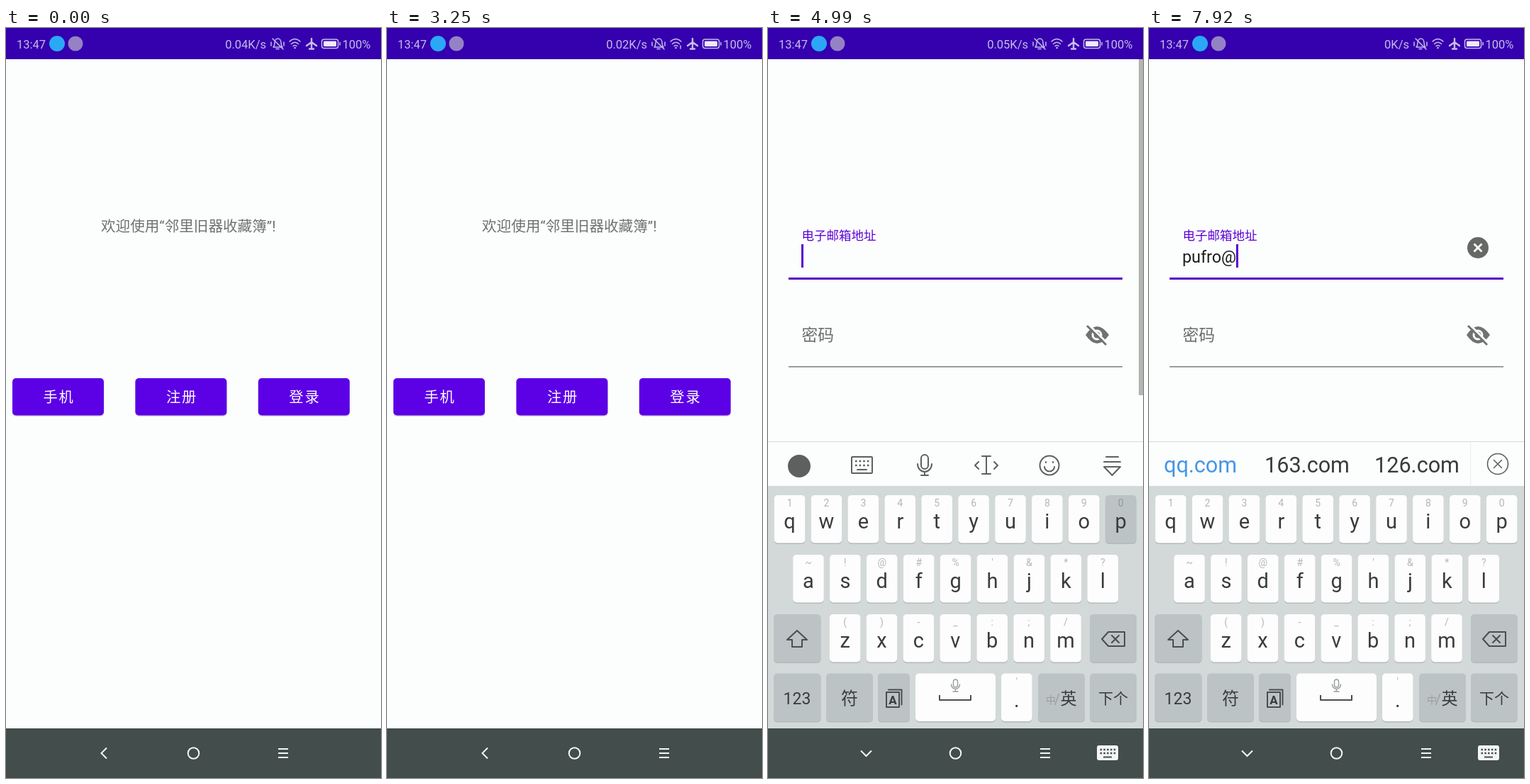
An HTML page for the animation above (8000 ms loop, 529 px wide and 1058 px high).

```html
<!DOCTYPE html>
<html lang="zh-CN">
<head>
<meta charset="utf-8">
<title>登录演示</title>
<style>
  html, body { margin: 0; width: 100%; height: 100%; overflow: hidden; background: #fcfdfd; }
  svg { display: block; width: 529px; height: 1058px; font-family: Roboto, "Noto Sans CJK SC", "Noto Sans CJK", sans-serif; }
  .line { fill: none; stroke-width: 2; stroke-linecap: round; stroke-linejoin: round; }
  .tools { stroke: #5d605f; }
  .status { stroke: #c8bbea; stroke-width: 1.5; }
  .nav { stroke: #f4f6f6; stroke-linecap: butt; stroke-linejoin: miter; }
  .key { fill: #fcfdfc; }
  .key.dark, .pressed .key { fill: #bcc3c5; }
  .letter { font-size: 29px; fill: #393c3b; text-anchor: middle; }
  .hint { font-size: 14px; fill: #b4b7b5; text-anchor: middle; }
  .pressed .hint { fill: #92989a; }
</style>
</head>
<body>
<svg viewBox="0 0 529 1058">
  <rect width="529" height="1058" fill="#fcfdfd"/>

  <g id="welcome">
    <text x="134" y="286.5" font-size="20.6" fill="#707073">欢迎使用“邻里旧器收藏簿”!</text>
    <g id="buttons"></g>
  </g>

  <g id="login">
    <rect y="44" width="529" height="944" fill="#fcfdfd"/>
    <text x="47.5" y="298.5" font-size="17.5" fill="#5a00d6">电子邮箱地址</text>
    <text id="email" x="47" y="331" font-size="23.3" fill="#1d1d1d"></text>
    <rect id="caret" y="305" width="3" height="33" fill="#5600cc"/>
    <rect x="29" y="352" width="471" height="3" fill="#5600c8"/>
    <g id="clear">
      <circle cx="464" cy="310" r="15" fill="#666865"/>
      <path d="M458.500 304.500l11 11m0-11l-11 11" stroke="#fff" stroke-width="2.800"/>
    </g>
    <text x="47.500" y="440.500" font-size="22.700" fill="#6a6b6b">密码</text>
    <rect x="29" y="477" width="471" height="1.600" fill="#858686"/>
    <g fill="none" stroke="#707270">
      <path d="M448 433Q464 409 481 433Q464 457 448 433Z" fill="#707270" stroke="none"/>
      <circle cx="464" cy="433" r="6" stroke="#fcfdfd" stroke-width="3"/>
      <path d="M451 417l28 28" stroke="#fcfdfd" stroke-width="3"/>
      <path d="M450 420l27 27" stroke-width="2.800"/>
    </g>
    <rect id="scrollbar" x="523" y="44" width="6" height="474" fill="#b3b5b0"/>
  </g>

  <g id="keyboard">
    <rect y="583" width="529" height="405" fill="#d2d9d8"/>
    <rect y="583" width="529" height="63" fill="#fcfdfd"/>
    <rect y="583" width="529" height="1" fill="#d6d8d8"/>
    <g id="tools" class="line tools">
      <circle cx="44" cy="618" r="15" fill="#5d605f"/>
      <rect x="118" y="605" width="29" height="23" rx="1"/>
      <path d="M123 611h20M123 617h20" stroke-width="2.600" stroke-dasharray="2.600 3" stroke-linecap="butt"/>
      <path d="M126 623h13"/>
      <rect x="216" y="602" width="10" height="20" rx="5"/>
      <path d="M211 615a10 11 0 0 0 20 0M221 626v5M216 631h10"/>
      <path d="M302 604h12M308 604v25M302 629h12M297 612l-5 5 5 5M319 612l5 5-5 5"/>
      <circle cx="397" cy="617" r="13.500"/>
      <path d="M390 619a7 6.500 0 0 0 14 0M392 612v1M402 612v1"/>
      <path d="M477 605h17M474 612h23M474 619h23l-11.500 12z"/>
    </g>
    <g id="suggestions" font-size="30.600" fill="#393b3b">
      <text x="21" y="627" fill="#4596e6">qq.com</text>
      <text x="163" y="627">163.com</text>
      <text x="318" y="627">126.com</text>
      <rect x="453" y="584" width="1.500" height="62" fill="#f0f2f2"/>
      <g class="line tools" style="stroke-width:1.6">
        <circle cx="492" cy="615" r="14.500"/>
        <path d="M486.500 609.500l11 11m0-11l-11 11"/>
      </g>
    </g>
    <g id="keys"></g>
    <g class="line" stroke="#4a4e4e">
      <path d="M41 850l14 13h-7v10h-14v-10h-7z"/>
      <path d="M471 862l9-10h23v20h-23zM485 857l10 10m0-10l-10 10"/>
      <path d="M167 937h18v21h-18zM170 933.500h18.500v21" />
      <path d="M242 941v7h44v-7" stroke-linecap="butt"/>
      <g stroke="#989c9b" stroke-width="1.400">
        <rect x="261.500" y="919" width="6" height="11" rx="3"/>
        <path d="M258.500 926a6 6.500 0 0 0 12 0M264.500 933v3M261 936h7"/>
      </g>
    </g>
    <g fill="#393c3b" text-anchor="middle">
      <text x="41" y="954" font-size="23">123</text>
      <text x="115" y="954" font-size="24">符</text>
      <text x="176" y="954" font-size="17" font-weight="700">A</text>
      <text x="399" y="953" font-size="14" fill="#999f9f">中</text>
      <text x="408" y="954" font-size="20" fill="#999f9f">/</text>
      <text x="424" y="954" font-size="23">英</text>
      <text x="487" y="953" font-size="21">下个</text>
    </g>
  </g>

  <rect width="529" height="44" fill="#3500ae"/>
  <g font-size="16.500" fill="#c8bbea">
    <text x="15" y="28.500">13:47</text>
    <text id="speed" x="367" y="28.500" text-anchor="end"></text>
    <text x="474.500" y="28.500">100%</text>
  </g>
  <circle cx="72" cy="22" r="11" fill="#2ba8f5"/>
  <circle cx="98" cy="22" r="10.500" fill="#9582c4"/>
  <g class="line status">
    <path d="M377 27h13q-2-2-2-6c0-8-9-8-9 0q0 4-2 6M381 29.500h4M376 15l15 15M374 20v5M392 20v5"/>
    <path d="M400 19q7.500-7 15 0M402.500 22.500q5-4.500 10 0M405 25.500q2.500-2 5 0"/>
    <circle cx="407.500" cy="28" r=".6"/>
    <path id="traffic" d="M414 25v4"/>
    <path d="M431 15v14M431 20l-7 5M431 20l7 5M428 29.500h6" stroke-width="2.400"/>
    <rect x="445.500" y="16" width="23" height="12.500" rx="3"/>
    <rect x="448" y="18.500" width="18" height="7.500" rx="1" fill="#efeafa" stroke="none"/>
    <path d="M471 20.500v3.500"/>
  </g>

  <rect y="988" width="529" height="70" fill="#424d4c"/>
  <g class="line nav">
    <path id="back"/>
    <circle cx="264.500" cy="1023" r="7.800"/>
    <path d="M384 1017h14M384 1023h14M384 1029h14"/>
  </g>
  <g id="switcher">
    <rect x="464" y="1012" width="30" height="21" rx="3" fill="#f4f6f6"/>
    <path d="M468.500 1018h22M468.500 1023h22" stroke="#424d4c" stroke-width="2.500" stroke-dasharray="2.500 2.300"/>
    <path d="M473 1028.500h12" stroke="#424d4c" stroke-width="2"/>
  </g>
</svg>

<script>
const $ = id => document.getElementById(id);
const show = (id, on) => $(id).setAttribute('visibility', on ? 'visible' : 'hidden');
const clamp = v => Math.max(0, Math.min(1, v));

const box = (x, y, w, h, r, fill) =>
  `<rect x="${x}" y="${y}" width="${w}" height="${h}" rx="${r}" ${fill}/>`;

$('buttons').innerHTML = ['手机', '注册', '登录'].map((label, i) => {
  const x = 9 + 173.4 * i;
  return box(x, 496, 129, 52, 5, 'fill="#d5d5dc"') +
    box(x, 494, 129, 52.5, 5, `id="button${i}" fill="#5c00e6"`) +
    `<text x="${x + 43.5}" y="528" font-size="20.3" letter-spacing="1.8" fill="#fff">${label}</text>`;
}).join('');

function key(x, y, w, dark = false) {
  return box(x, y + 1.5, w, 67.5, 5, 'fill="#b3babb"') +
    box(x, y, w, 67.5, 5, `class="key${dark ? ' dark' : ''}"`);
}

function letterRow(letters, hints, x0, y) {
  return [...letters].map((letter, i) => {
    const x = x0 + 51.9 * i, mid = x + 21.8;
    const hint = hints[i].replace('&', '&amp;');
    return `<g id="key-${letter}">${key(x, y, 43.6)}
      <text class="hint" x="${mid}" y="${y + 16}">${hint}</text>
      <text class="letter" x="${mid}" y="${y + 47}">${letter}</text></g>`;
  }).join('');
}

$('keys').innerHTML =
  letterRow('qwertyuiop', '1234567890', 8.8, 659) +
  letterRow('asdfghjkl', "~!@#%'&*?", 35.2, 743) +
  letterRow('zxcvbnm', '()-_:;/', 86.8, 827) +
  letterRow('.', "'", 329, 910.5) +
  key(8, 827, 66.5, true) + key(454, 827, 66, true) +
  key(8, 910.5, 66.5, true) + key(82, 910.5, 66, true) + key(155, 910.5, 45, true) +
  key(208, 910.5, 113) + key(381, 910.5, 66, true) + key(454, 910.5, 66, true);

// All times below are in screen-refresh steps.
const LOOP = 8000, STEP = 108.5;
const NAME = 'pufro', PRESSES = [46, 49, 52, 54, 56];
const AT_DOWN = 61, AT_UP = 67;

function render(time) {
  const s = Math.floor((time + 6) / STEP);

  $('speed').textContent = s < 11 ? '0.04K/s' : s < 31 ? '0.02K/s' : s < 50 ? '0.05K/s' : '0K/s';
  show('traffic', s >= 11 && s < 31);

  $('button2').setAttribute('fill', s === 36 ? '#7a30ea' : '#5c00e6');
  show('welcome', s < 38);
  show('login', s >= 37);
  $('login').setAttribute('transform', `translate(${s === 37 ? 200 : 0} 0)`);

  const rise = clamp((s - 38) / 3);
  const keyboardUp = rise > 0;
  show('keyboard', keyboardUp);
  $('keyboard').setAttribute('transform', `translate(0 ${405 * (1 - rise) ** 2})`);
  show('switcher', keyboardUp);
  $('back').setAttribute('d', keyboardUp ? 'M131 1019.500l7.500 7.500 7.500-7.500' : 'M142 1015.500l-7.500 7.500 7.500 7.500');
  $('scrollbar').setAttribute('opacity', keyboardUp ? clamp((52 - s) / 5) : 0);

  const typed = PRESSES.filter(p => s > p).length;
  $('email').textContent = NAME.slice(0, typed) + (s >= AT_UP ? '@' : '');
  $('caret').setAttribute('x', 47 + (typed ? $('email').getComputedTextLength() : 0));
  show('caret', s >= 38 && (s < 62 || s >= 66));
  show('clear', typed > 0);

  const held = s >= AT_DOWN && s < AT_UP ? 'd' : NAME[PRESSES.indexOf(s)];
  for (const el of $('keys').querySelectorAll('g')) {
    el.classList.toggle('pressed', el.id === 'key-' + held);
  }

  const suggesting = s >= AT_UP + 1;
  show('suggestions', suggesting);
  $('tools').setAttribute('display', suggesting ? 'none' : 'inline');
  $('suggestions').setAttribute('display', suggesting ? 'inline' : 'none');
}

function frame() {
  render(performance.now() % LOOP);
  requestAnimationFrame(frame);
}
frame();
</script>
</body>
</html>
```
